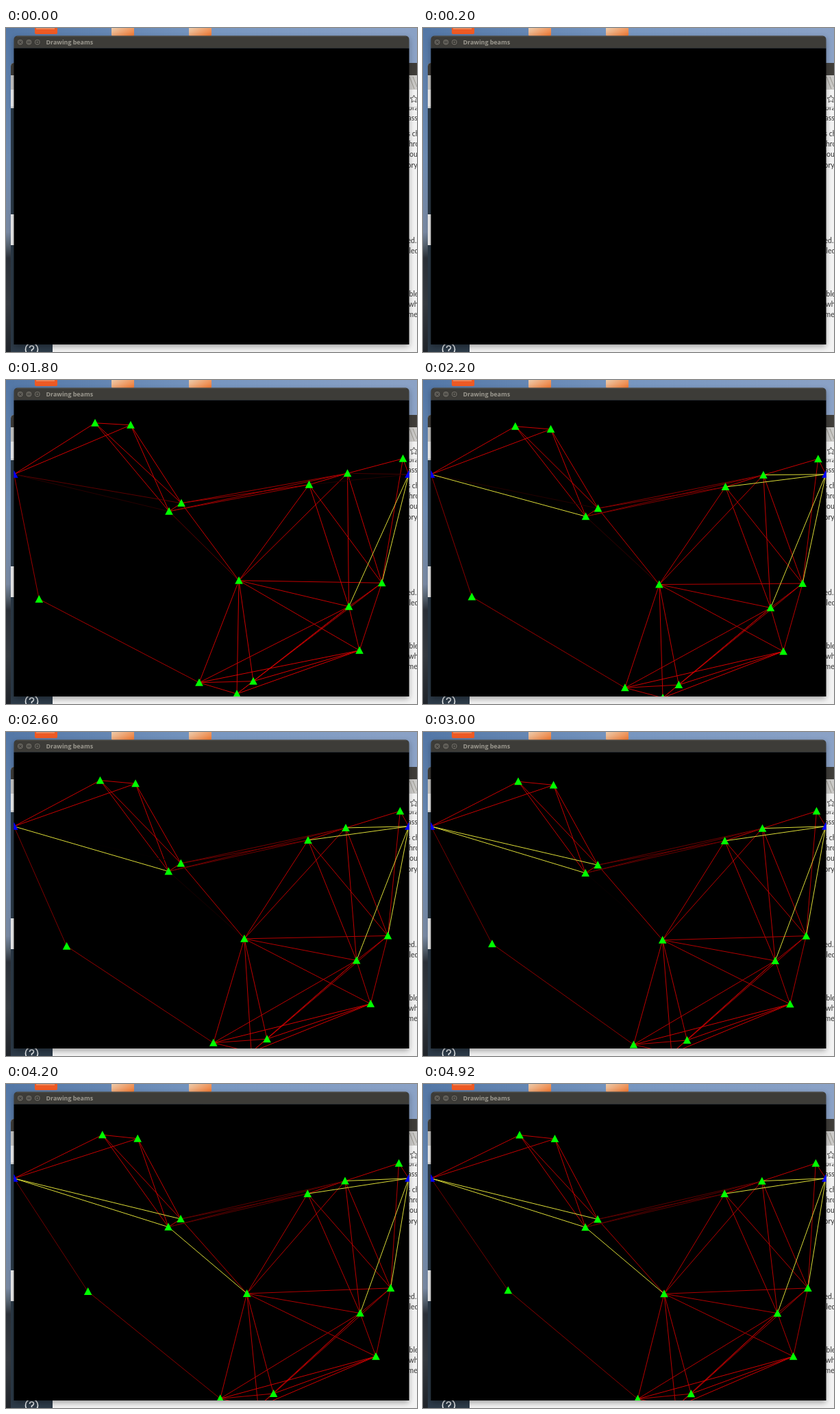
Write an HTML page with a canvas that moves like this. It is 600 by 473 pixels and loops after 4960 ms.

```html
<!DOCTYPE html>
<html lang="en">
<head>
<meta charset="utf-8">
<title>Drawing beams</title>
<style>
  html, body { margin: 0; width: 100%; height: 100%; overflow: hidden; background: #000; }
  svg, canvas { position: absolute; left: 0; top: 0; width: 600px; height: 473px; display: block; }
  .page { font: 10.5px Lato, sans-serif; fill: #333; }
  .title { font: 700 8.9px "Open Sans", sans-serif; fill: #9b988f; }
</style>
</head>
<body>
<svg viewBox="0 0 600 473">
  <defs>
    <linearGradient id="sky">
      <stop offset="0" stop-color="#5377a6"/>
      <stop offset=".5" stop-color="#7796c0"/>
      <stop offset="1" stop-color="#8ba2c6"/>
    </linearGradient>
    <linearGradient id="edge" x2="0" y2="1">
      <stop offset="0" stop-color="#5377a6"/>
      <stop offset=".4" stop-color="#6d8bb2"/>
      <stop offset=".63" stop-color="#7787a0"/>
      <stop offset=".67" stop-color="#56626f"/>
      <stop offset=".71" stop-color="#2b3038"/>
      <stop offset=".85" stop-color="#353a40"/>
      <stop offset="1" stop-color="#20242a"/>
    </linearGradient>
    <linearGradient id="folder" x2="1" y2="1">
      <stop offset=".2" stop-color="#ecc9a8"/>
      <stop offset="1" stop-color="#f0762f"/>
    </linearGradient>
    <filter id="shadow" x="-10%" y="-10%" width="120%" height="120%">
      <feGaussianBlur stdDeviation="4"/>
    </filter>
  </defs>

  <rect width="600" height="473" fill="url(#sky)"/>
  <rect width="12" height="473" fill="url(#edge)"/>
  <rect x="42" y="-6" width="33" height="15" rx="2" fill="#ee5a24"/>
  <path d="M44 1h27" stroke="#e9b28e"/>
  <rect x="154" y="-6" width="33" height="18" rx="2" fill="url(#folder)"/>
  <rect x="267" y="-6" width="33" height="18" rx="2" fill="url(#folder)"/>

  <!-- browser behind -->
  <path d="M7 473V56q0-5 5-5h588v422z" fill="#f3f3f3"/>
  <g class="page">
    <text x="587" y="119.500">bra</text>
    <text x="586.500" y="134.500">assr</text>
    <text x="585.500" y="158">s ch</text>
    <text x="588" y="173">hro</text>
    <text x="586.500" y="188">iou</text>
    <text x="585.500" y="203.500">ory)</text>
    <text x="585.500" y="314">ed.</text>
    <text x="588.500" y="329">led</text>
    <text x="588.500" y="391.500">ble</text>
    <text x="587.500" y="407">wh</text>
    <text x="586.500" y="422">me</text>
  </g>
  <path d="M7 69V56q0-5 5-5h588v18z" fill="#3f3d39"/>
  <rect x="7" y="69" width="593" height="21" fill="#cbcac8"/>
  <path d="M589 71l7 18M594 71l6 15" stroke="#99978f" fill="none"/>
  <rect x="7" y="90" width="593" height="25" fill="#f3f3f3"/>
  <path d="M7 115.500h593" stroke="#c9c9c9"/>
  <rect x="7" y="117" width="61" height="155" fill="#2d3b49"/>
  <rect x="7" y="317" width="61" height="156" fill="#2d3b49"/>
  <path d="M595.5 98l1.6 3.6 3.9.4-2.9 2.6.8 3.9-3.4-2-3.4 2 .8-3.9-2.9-2.6 3.9-.4z"
        fill="none" stroke="#555"/>
  <circle cx="37.500" cy="469" r="9" fill="none" stroke="#e8ecef" stroke-width="1.600"/>
  <path d="M34.500 467q0-3 3-3t3 2.700q0 1.800-3 3.300v2" fill="none" stroke="#e8ecef" stroke-width="1.600"/>

  <!-- front window -->
  <rect x="12" y="15" width="576" height="450" filter="url(#shadow)" opacity=".35"/>
  <path d="M11.500 29.500V17q0-5.500 5.500-5.500h566q5.500 0 5.500 5.500v12.500z" fill="#3d3c38"/>
  <path d="M16 12h568" stroke="#54524c"/>
  <g fill="#605e58" stroke="#2f2e2b" stroke-width=".8">
    <circle cx="20.800" cy="20.700" r="4.800"/>
    <circle cx="33.400" cy="20.700" r="4.800"/>
    <circle cx="45.800" cy="20.700" r="4.800"/>
  </g>
  <path d="M19 19l3.600 3.600m0-3.600l-3.600 3.600M31.200 20.700h4.400M44 19h3.600v3.500h-3.600z"
        fill="none" stroke="#33322f"/>
  <text class="title" x="58.500" y="24">Drawing beams</text>
  <rect x="11.500" y="29.500" width="577" height="432.500"/>
</svg>
<canvas id="view" width="600" height="473"></canvas>

<script>
const LOOP = 4960, START = 1320, MID = 0.48, RATE = 1.35;
const ctx = document.getElementById('view').getContext('2d');

// Each joint: x and y at the start, after MID seconds, and at rest.
const joints = {
  A: [117.5, 53, 130, 63, 141.2, 75],
  B: [170, 51.5, 182, 66, 192.6, 80.5],
  C: [258.3, 160.7, 256, 180, 255, 198],
  D: [240.3, 174, 238, 192, 237, 209.7],
  E: [445.7, 143, 442.5, 153, 440.2, 160.7],
  F: [503, 129.3, 498.5, 136.5, 494.8, 142],
  G: [586.5, 113, 579.5, 115, 573.3, 116],
  H: [333.2, 279.2, 340, 293, 352.2, 306.7],
  I: [541.2, 292.3, 548.7, 296.5, 562.1, 298.2],
  J: [490.5, 324.2, 500.5, 331, 517.7, 335],
  K: [502, 388.3, 516, 395, 541, 398],
  L: [265.2, 426, 282, 442, 314, 460.3],
  M: [318.7, 445.2, 337, 458.5, 369.5, 472],
  N: [344, 426.7, 361, 440, 391.8, 452.7]
};
const anchors = { Q: [11.7, 138], R: [588, 138] };

// Red level at the start and at rest; a level below zero means overloaded.
const beams = [
  [220, 195, 'AB AC AD BC BD QA QB CD EF FG'],
  [220, 185, 'CH EH FH EI EJ FI FJ HL HM HN'],
  [215, 175, 'HI HJ HK GI GR IJ IK JK'],
  [215, 180, 'JL JM JN IN LM LN MN'],
  [225, 205, 'KL KM KN'],
  [225, 90, 'CE CF DE DF'],
  [195, 135, 'LP'],
  [200, 110, 'QP'],
  [195, -11, 'DH'],
  [210, -39, 'QC'],
  [210, -147, 'QD'],
  [210, -160, 'ER'],
  [210, -93, 'FR'],
  [160, -320, 'IR'],
  [100, -446, 'JR']
];

// Slow decay towards rest plus a fast term that makes the path meet mid.
function settle(start, mid, end, rate, time) {
  const slow = Math.exp(-rate * MID), fast = slow ** 4;
  const b = (mid - end - slow * (start - end)) / (fast - slow);
  const decay = Math.exp(-rate * time);
  return end + (start - end - b) * decay + b * decay ** 4;
}

function pose(time) {
  const points = { ...anchors };
  for (const [name, [x0, y0, x1, y1, x2, y2]] of Object.entries(joints)) {
    points[name] = [settle(x0, x1, x2, RATE, time), settle(y0, y1, y2, RATE, time)];
  }
  const x = settle(19.3, 48.3, 129.2, 0.91, time);
  points.P = [x, 321.7 - 0.00183 * (x - 19.3) ** 2];
  return points;
}

function drawBeam([x0, y0], [x1, y1], level) {
  ctx.strokeStyle = level < 0 ? 'rgb(220,220,55)' : `rgb(${level},0,0)`;
  ctx.beginPath();
  ctx.moveTo(x0, y0);
  ctx.lineTo(x1, y1);
  ctx.stroke();
}

function drawJoint([x, y], color) {
  ctx.fillStyle = color;
  ctx.beginPath();
  ctx.moveTo(x, y - 6);
  ctx.lineTo(x + 5.8, y + 5);
  ctx.lineTo(x - 5.8, y + 5);
  ctx.fill();
}

function draw(time) {
  const points = pose(time), load = 1 - Math.exp(-RATE * time);
  for (const [from, to, pairs] of beams) {
    const level = from + (to - from) * load;
    for (const [a, b] of pairs.split(' ')) drawBeam(points[a], points[b], level);
  }
  for (const name in points) drawJoint(points[name], name in anchors ? '#00f' : '#0f0');
}

// Three pictures every 200 ms, held for 80, 80 and 40 ms.
function hold(ms) {
  const part = ms % 200;
  return ms - part + Math.floor(part / 80) * 80;
}

ctx.beginPath();
ctx.rect(11.5, 29.5, 577, 432.5);
ctx.clip();
ctx.translate(0, -0.25);

function frame() {
  const elapsed = performance.now() % LOOP - START;
  ctx.clearRect(0, 0, 600, 473);
  if (elapsed >= 0) draw(hold(elapsed) / 1000);
  requestAnimationFrame(frame);
}
frame();
</script>
</body>
</html>
```
